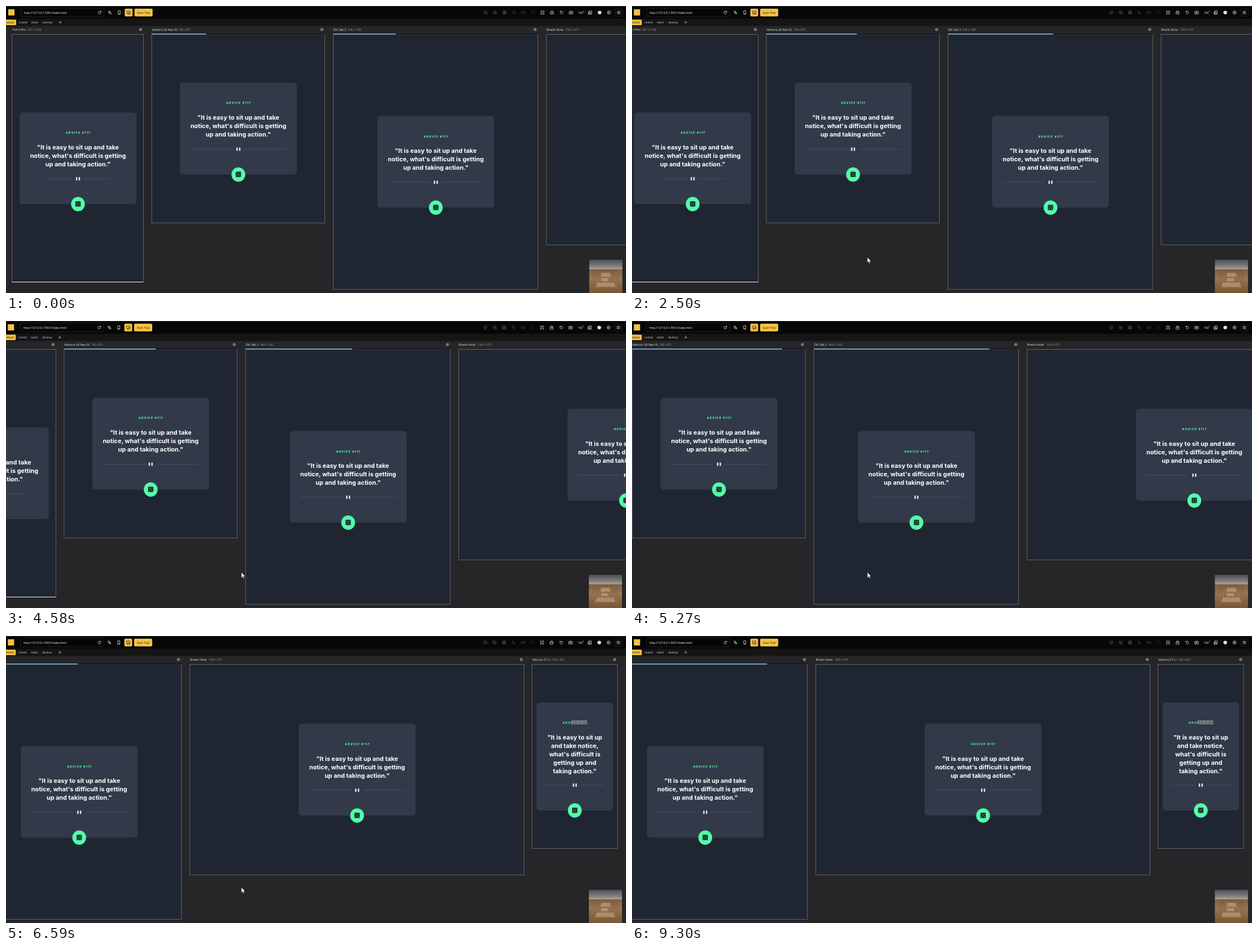
These frames come from a looping animation (1098 px wide and 510 px high, 9400 ms). An HTML page:

```html
<!DOCTYPE html>
<html lang="en">
<head>
<meta charset="utf-8">
<title>Responsive preview</title>
<style>
  html, body { margin: 0; width: 100%; height: 100%; overflow: hidden; background: #262628; }
  svg { display: block; }
  text { font-family: "Open Sans", "Noto Sans", sans-serif; white-space: pre; }
  .url { font-size: 5.05px; font-weight: 500; fill: #fff; }
  .trial { font-size: 5.1px; font-weight: 500; fill: #1c1a14; text-anchor: middle; }
  .tab { font-size: 4.7px; fill: #c4c4c4; }
  .name { font-size: 5.4px; fill: #e6e6e6; }
  .dims { font-size: 4.7px; fill: #9a9a9c; }
  .advice, .quote { font-family: Inter, "Open Sans", sans-serif; text-anchor: middle; }
  .advice { font-size: 5px; font-weight: 800; letter-spacing: 1.2px; fill: #52ffa8; }
  .quote { font-size: 10.8px; font-weight: 700; fill: #fff; }
  .icon { fill: none; stroke-width: .8; stroke-linecap: round; stroke-linejoin: round; }
</style>
</head>
<body>
<svg id="stage" width="1098" height="510" viewBox="0 0 1098 510">
  <defs>
    <linearGradient id="sky" x2="0" y2="1">
      <stop offset="0" stop-color="#4b5056"/>
      <stop offset=".6" stop-color="#7a7a7b"/>
      <stop offset="1" stop-color="#b3a08c"/>
    </linearGradient>
    <linearGradient id="field" x2="0" y2="1">
      <stop offset="0" stop-color="#7d6046"/>
      <stop offset=".4" stop-color="#9c7852"/>
      <stop offset="1" stop-color="#7d5936"/>
    </linearGradient>
  </defs>
  <rect width="1098" height="510" fill="#262628"/>
  <g id="devices"></g>
  <rect width="1098" height="35.5" fill="#151516"/>
  <rect width="1098" height="22.5" fill="#070708"/>
  <rect width="1098" height="1" fill="#242425"/>
  <g id="chrome"></g>
  <path id="cursor" d="M0 0V9.8L2.2 7.8L3.8 11.2L5.4 10.5L3.9 7.2H6.9Z"
    fill="#fff" stroke="#111" stroke-width=".6" visibility="hidden"/>
</svg>
<script>
const $ = id => document.getElementById(id);
const LOOP = 9400, STEP = 9300 / 134, LAST = 134;
const BAR_RATE = 0.0004837;

const rect = (x, y, w, h, fill, extra = '') =>
  `<rect x="${x}" y="${y}" width="${w}" height="${h}" fill="${fill}" ${extra}/>`;
const text = (x, y, cls, body, extra = '') =>
  `<text x="${x}" y="${y}" class="${cls}" ${extra}>${body}</text>`;
const icon = (x, y, d, color = '#dcdcdc') =>
  `<path class="icon" transform="translate(${x} ${y})" d="${d}" stroke="${color}"/>`;
const ring = r => `M${-r} 0a${r} ${r} 0 1 1 ${2 * r} 0a${r} ${r} 0 1 1 ${-2 * r} 0`;

const GEAR = ring(2.2) + ring(.8);
const RELOAD = 'M2.2 -1A2.5 2.5 0 1 0 2.4 .9M2.4 -2.6V-.8H.6';

const wide = ['"It is easy to sit up and take', "notice, what's difficult is getting", 'up and taking action."'];
const narrow = ['"It is easy to sit up', 'and take notice,', "what's difficult is", 'getting up and', 'taking action."'];

const devices = [
  { name: 'Tivil 4 Pro', dims: '607 x 1148', gap: 28, x: 10.5, w: 233, h: 440,
    card: [24, 189.3, 207, 162.7], half: 56.5, underline: true },
  { name: 'Velnora 26 Neo XL', dims: '798 x 873', gap: 48, x: 258, w: 306.5, h: 335,
    card: [308, 136.3, 207, 163.2], half: 85, phase: .314 },
  { name: 'Zilt Tab 3', dims: '944 x 1180', gap: 26, x: 579.5, w: 362.5, h: 453,
    card: [657.7, 195.5, 207, 162.7], half: 85, phase: .305 },
  { name: 'Brevlo Note', dims: '1543 x 975', gap: 33.5, x: 957, w: 592, h: 374,
    card: [1149.8, 155.7, 207, 163.3], half: 85 },
  { name: 'Velnora 27 Li', dims: '393 x 852', gap: 36, x: 1563, w: 151.5, h: 327,
    card: [1571, 118, 135.6, 192], half: 53, lines: narrow, selected: true }
];

function drawCard({ card: [x, y, w, h], half, lines = wide, selected }) {
  const cx = x + w / 2, rule = y + h - 45, end = y + h;
  const dots = [[0, 0], [-2.2, -2.2], [2.2, -2.2], [-2.2, 2.2], [2.2, 2.2]];
  const advice = selected ? 'ADVI<tspan fill="#454a52">CE #117</tspan>' : 'ADVICE #117';
  return rect(x, y, w, h, '#323a49', 'rx="5.5"') +
    (selected ? rect(cx - 6, y + 32, 28, 7, '#7c7f84') : '') +
    text(cx + .6, y + 38, 'advice', advice) +
    lines.map((s, i) => text(cx, y + 65.8 + 15 * i, 'quote', s)).join('') +
    `<path d="M${cx - half} ${rule}H${cx - 9.5}M${cx + 9.5} ${rule}H${cx + half}" stroke="#4b5a70" stroke-width=".7"/>` +
    rect(cx - 3.7, rule - 3, 2.6, 6, '#cee3e9', 'rx=".8"') +
    rect(cx + 1.1, rule - 3, 2.6, 6, '#cee3e9', 'rx=".8"') +
    `<ellipse cx="${cx}" cy="${end}" rx="12.2" ry="12.7" fill="#52ffa8"/>` +
    rect(cx - 4.7, end - 4.9, 9.4, 9.4, '#202733', 'rx="1.4"') +
    dots.map(([a, b]) => `<circle cx="${cx + a}" cy="${end - .2 + b}" r=".7" fill="#52ffa8"/>`).join('');
}

function drawDevice(d) {
  const { x, w, h } = d;
  return text(x + .3, 43.8, 'name', d.name) + text(x + d.gap, 43.8, 'dims', d.dims) +
    icon(x + w - 5, 41.8, GEAR, '#b5b5b5') +
    rect(x, 50.5, w, h, '#1f2632', 'stroke="#666a71" stroke-width=".9"') +
    (d.phase ? rect(x, 49, w, 1.5, '#090b10') + rect(x, 49, 0, 1.5, '#86bdf6', 'class="bar"') : '') +
    (d.underline ? rect(x, 490, w, 1, '#f0f1f2') : '') +
    drawCard(d);
}

function drawPhoto() {
  const furrows = Array.from({ length: 13 }, (_, i) =>
    `M${1062 + (i - 6) * 3.2} 468L${1062 + (i - 6) * 4.85} 510`).join('');
  return rect(1033, 451, 58.6, 17, 'url(#sky)') + rect(1033, 468, 58.6, 42, 'url(#field)') +
    `<path d="${furrows}" stroke="#5f4228" stroke-width=".8" opacity=".5"/>` +
    '<path d="M1055 474H1070L1071.5 481H1053.5ZM1055 483.5H1066L1067 489H1054ZM1047 491.5H1077L1080 499.5H1044Z" fill="#dcc6a4" opacity=".4"/>';
}

function drawChrome() {
  const dim = '#4b4b4d', dark = '#2a2517', gold = '#f5c342';
  const left = rect(4, 5.8, 11, 11, gold) +
    rect(26.5, 3.8, 147, 15.4, '#060607', 'rx="2" stroke="#29292b" stroke-width=".8"') +
    text(31.6, 13.6, 'url', 'http://127.0.0.1:5501/index.html') +
    icon(166, 11.5, RELOAD) +
    icon(183.6, 11.5, 'M-2.6 -1.6H.6M-1 -2.8V-1.6M-2.4 1.2L.4 -1.6M-.2 2.8L1.3 -.6L2.8 2.8M.4 1.6H2.2') +
    icon(200.6, 11.5, 'M-1.7 -3H1.7V3H-1.7ZM-.4 1.8H.4') +
    rect(210.3, 4.8, 13.8, 13.6, gold, 'rx="2"') +
    icon(217.2, 11.5, 'M-.4 1.6H-3V-2.6H2.8V-1M-2 3H-.4M.6 0H3.2V3H.6Z', dark) +
    rect(227.6, 4.8, 32, 13.6, gold, 'rx="2"') +
    text(243.6, 13.5, 'trial', 'Start Trial');
  const faint = [
    'M0 -3L2.7 -1.5V1.5L0 3L-2.7 1.5V-1.5ZM-2.7 -1.5L0 0L2.7 -1.5M0 0V3',
    'M-2.8 -2.6H1V1H-2.8ZM-.8 -.8H3V2.8H-.8Z',
    'M-2.7 -2.7H2.7V2.7H-2.7ZM-2.7 -.9H2.7M-2.7 .9H2.7M-.9 -2.7V2.7M.9 -2.7V2.7',
    'M-2.8 -1.4L-1.4 -2.8L2.8 1.4L1.4 2.8ZM-.6 -1.2L-1.2 -.6M1 .4L.4 1',
    'M-3 -1.5H3V1.5H-3Z',
    'M-2.4 -2.2h.2M0 -2.2h.2M2.4 -2.2h.2M-2.4 0h.2M0 0h.2M2.4 0h.2M-2.4 2.2h.2M0 2.2h.2M2.4 2.2h.2'
  ].map((d, i) => icon(849.4 + 16.75 * i, 11.6, d, dim)).join('');
  const right =
    icon(950, 11.6, 'M-2.8 -1V-2.8H-1M1 -2.8H2.8V-1M2.8 1V2.8H1M-1 2.8H-2.8V1M-1.4 -1.4L1.4 1.4M1.4 -1.4L-1.4 1.4') +
    icon(967, 11.6, 'M-2.6 -.4H2.6V2.8H-2.6ZM-1.6 -.4V-2.6H1.6V-.4') +
    icon(984, 11.6, 'M-2.2 -1A2.5 2.5 0 1 1 -2.3 1M-2.4 -2.6V-.8H-.6') +
    icon(1000.7, 11.6, 'M-3 -1.6H-1.5L-.9 -2.6H.9L1.5 -1.6H3V2.6H-3Z' + ring(1.1)) +
    text(1013.3, 13.5, 'url', '100') + text(1022, 10.5, 'dims', '%', 'style="font-size:3px;fill:#ddd"') +
    icon(1034.6, 11.6, 'M-1.6 -2.8H2.6V2.8H-1.6ZM-2.8 -.6H.6V2.8H-2.8Z') +
    '<circle cx="1051.3" cy="11.6" r="3.2" fill="#e4e4e4"/>' +
    icon(1068, 11.6, ring(2.9) + 'M-.6 -1L1 0L-.6 1Z') +
    rect(1078.6, 4.8, 13.2, 13.6, '#0a0a0b', 'rx="2" stroke="#232325" stroke-width=".8"') +
    icon(1085.2, 11.6, 'M-2.5 -2H2.5M-2.5 0H2.5M-2.5 2H2.5');
  const tabs = rect(-4, 24.3, 22, 9.6, gold, 'rx="1.5"') +
    text(-.5, 30.8, 'tab', 'default', 'style="fill:#2a2517"') +
    text(22.6, 30.8, 'tab', 'mobile') + text(44.6, 30.8, 'tab', 'tablet') +
    text(64.6, 30.8, 'tab', 'desktop') + icon(96, 29, 'M-2 0H2M0 -2V2', '#b8b8b8');
  return left + faint + right + tabs + drawPhoto();
}

$('devices').innerHTML = devices.map(drawDevice).join('');
$('chrome').innerHTML = drawChrome();
const bars = [...document.querySelectorAll('.bar')];
const loading = devices.filter(d => d.phase);

// Smooth monotone curve through [time, value] points.
function curve(points) {
  const slope = points.slice(1).map(([t, v], i) => (v - points[i][1]) / (t - points[i][0]));
  const tangent = points.map((_, i) => {
    const a = slope[i - 1] || 0, b = slope[i] || 0;
    return a * b > 0 ? 2 * a * b / (a + b) : 0;
  });
  return t => {
    if (t <= points[0][0]) return points[0][1];
    const i = points.findIndex(p => p[0] >= t) - 1;
    if (i < 0) return points[points.length - 1][1];
    const [t0, v0] = points[i], [t1, v1] = points[i + 1];
    const len = t1 - t0, u = (t - t0) / len, s = u * u * (3 - 2 * u);
    return v0 + (v1 - v0) * s +
      len * u * (1 - u) * (tangent[i] * (1 - u) - tangent[i + 1] * u);
  };
}

const scroll = curve([[2080, 0], [2498, 20], [2920, 42], [3817, 70.5], [5275, 257.5], [5969, 345.2], [6560, 631.5]]);
const mouseX = curve([[480, 969], [800, 720], [1300, 416.8], [8350, 416.8], [8880, 1078], [9020, 1084]]);
const mouseY = curve([[480, 508], [800, 478], [1300, 446.5], [8350, 446.5], [8880, 489], [9020, 512]]);

function draw(now) {
  const t = Math.min(LAST, Math.floor(now % LOOP / STEP + .1)) * STEP;
  $('devices').setAttribute('transform', `translate(${-scroll(t)} 0)`);
  $('chrome').setAttribute('transform', `translate(${t < 1500 ? 0 : -.7} 0)`);
  bars.forEach((bar, i) => {
    const { phase, w } = loading[i];
    bar.setAttribute('width', (phase + t * BAR_RATE) % 1 * w);
  });
  $('cursor').setAttribute('transform', `translate(${mouseX(t)} ${mouseY(t)})`);
  $('cursor').setAttribute('visibility', t > 480 && t < 9020 ? 'visible' : 'hidden');
}

const start = performance.now();
(function tick() {
  draw(performance.now() - start);
  requestAnimationFrame(tick);
})();
</script>
</body>
</html>
```
